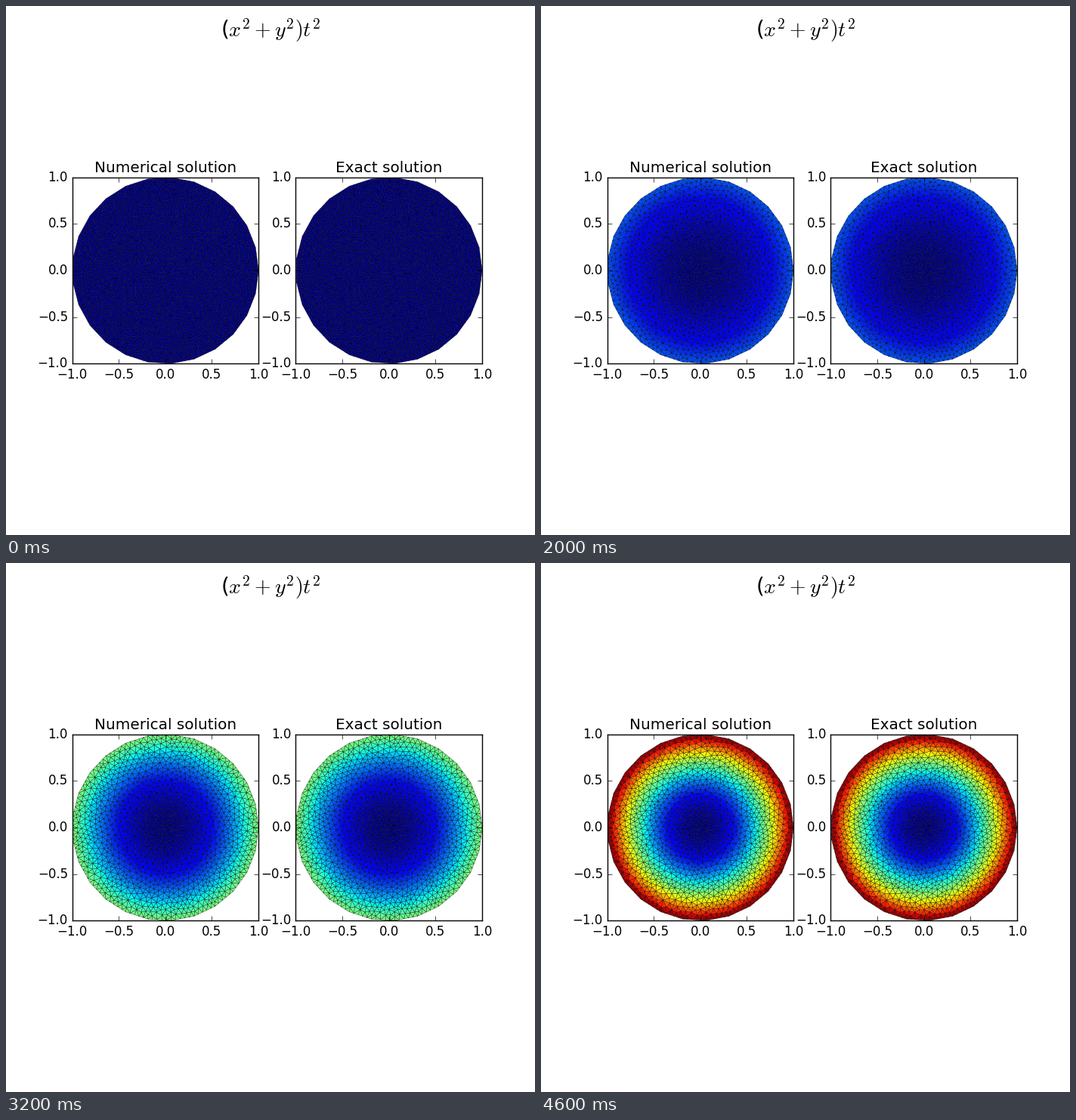
A matplotlib script for the animation above (4.8 s loop, 700x700 px).

```python
import numpy as np
import matplotlib.pyplot as plt
from matplotlib.animation import FuncAnimation
from matplotlib.tri import Triangulation

FRAMES, INTERVAL = 24, 200
SIDES, SPLIT = 25, 5
SPACING = 0.041

plt.style.use("classic")
plt.rcParams.update({"figure.facecolor": "white", "savefig.facecolor": "white",
                     "font.family": "DejaVu Sans", "mathtext.fontset": "cm"})


def polygon_rim():
    """Points along the sides of a regular polygon in the unit circle."""
    a = 2 * np.pi * np.arange(SIDES + 1) / SIDES
    corners = np.column_stack([np.cos(a), np.sin(a)])
    s = np.arange(SPLIT)[:, None] / SPLIT
    return np.vstack([p + s * (q - p) for p, q in zip(corners, corners[1:])])


def triangulate(points):
    tri = Triangulation(*points.T)
    a, b, c = (points[tri.triangles[:, i]] for i in range(3))
    u, v = b - a, c - a
    area = np.abs(u[:, 0] * v[:, 1] - u[:, 1] * v[:, 0]) / 2
    return Triangulation(*points.T, tri.triangles[area > 1e-5])


def disk_mesh(seed=4):
    """Irregular mesh: dart throwing, then light smoothing of inner points."""
    rng = np.random.default_rng(seed)
    rim = polygon_rim()
    points = np.empty((4000, 2))
    n = len(rim)
    points[:n] = rim
    for p in rng.uniform(-1, 1, (24000, 2)):
        if np.hypot(*p) > 0.965:
            continue
        if ((points[:n] - p) ** 2).sum(axis=1).min() > SPACING ** 2:
            points[n] = p
            n += 1
    points = points[:n]
    for _ in range(2):
        i, j = triangulate(points).edges.T
        total, count = np.zeros_like(points), np.zeros(n)
        for s, e in ((i, j), (j, i)):
            np.add.at(total, s, points[e])
            np.add.at(count, s, 1)
        inner = slice(len(rim), None)
        points[inner] = (total / count[:, None])[inner]
    return triangulate(points)


mesh = disk_mesh()
face_r2 = (mesh.x ** 2 + mesh.y ** 2)[mesh.triangles].mean(axis=1)

fig, axes = plt.subplots(1, 2, figsize=(7, 7), dpi=100)
fig.suptitle("($x^2+y^2)t^2$", fontsize=20)


def solution_plot(ax, title):
    faces = ax.tripcolor(mesh, facecolors=face_r2, cmap="jet", vmin=0,
                         vmax=face_r2.max(), edgecolors="k", linewidth=0.25)
    ticks = np.linspace(-1, 1, 5)
    ax.set(title=title, aspect="equal", xlim=(-1, 1), ylim=(-1, 1),
           xticks=ticks, yticks=ticks)
    return faces


plots = [solution_plot(ax, name) for ax, name in
         zip(axes, ("Numerical solution", "Exact solution"))]


def update(k):
    t = (k + 1) / FRAMES
    for faces in plots:
        faces.set_array(face_r2 * t ** 2)
    return plots


anim = FuncAnimation(fig, update, frames=FRAMES, interval=INTERVAL,
                     init_func=lambda: update(0), repeat=True, repeat_delay=0)
plt.show()
```
